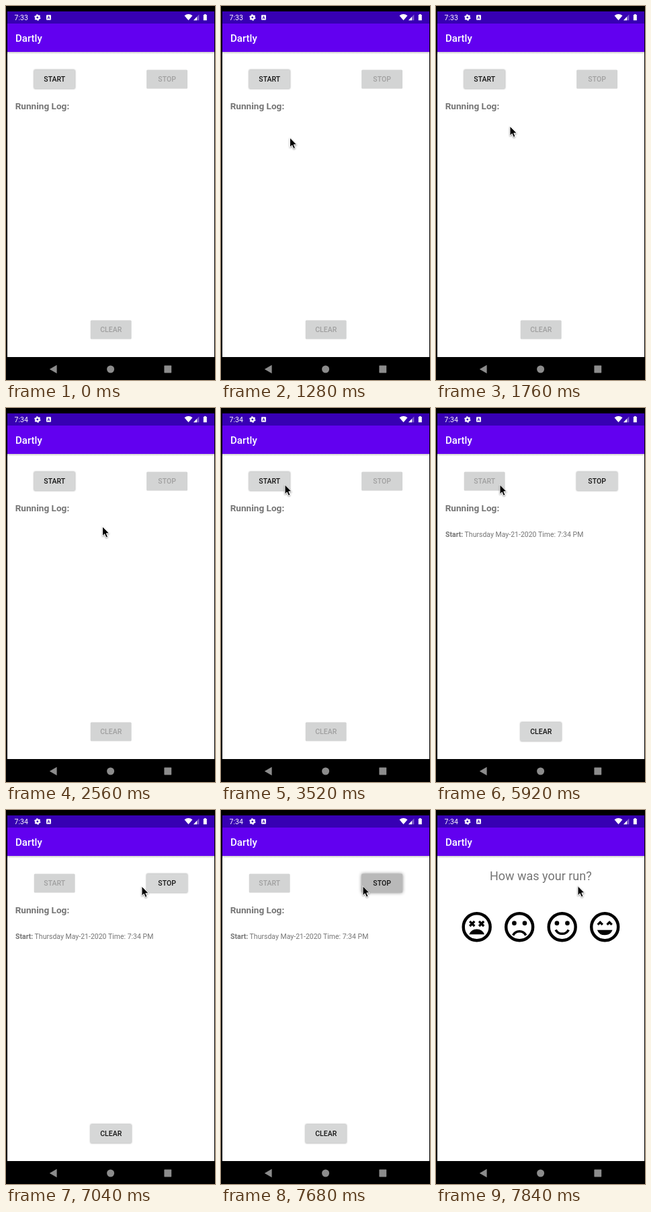
Animation of 311x554 px, one loop 8 s. Source, as an HTML page:

```html
<!DOCTYPE html>
<html lang="en">
<head>
<meta charset="utf-8">
<title>Run log</title>
<style>
  html, body { margin: 0; width: 100%; height: 100%; overflow: hidden; background: #000; }
  svg { display: block; width: 100%; height: 100%; }
  text { font-family: Roboto, sans-serif; font-size: 10.5px; fill: #757575; }
  .bar { fill: #fff; }
  .title { font-size: 15px; font-weight: 500; }
  .heading { font-size: 13.6px; font-weight: 700; }
  .bold { font-weight: 700; }
  .question { font-size: 18px; text-anchor: middle; }
  .button rect { fill: #d6d7d7; filter: drop-shadow(0 .8px .8px #0006); }
  .button text { fill: #151515; font-weight: 500; text-anchor: middle; }
  .button.disabled rect { fill: #d3d4d4; filter: none; }
  .button.disabled text { fill: #a0a0a0; }
  .button.pressed rect { fill: #b9b9b9; filter: drop-shadow(0 .8px 2.5px #0007); }
  .cursor { filter: drop-shadow(0 1px 1px #0006); }
  .line { fill: none; stroke: #000; stroke-width: 2; }
</style>
</head>
<body>
<svg viewBox="0 0 311 554" preserveAspectRatio="none">
  <defs>
    <linearGradient id="shade" x2="0" y2="1">
      <stop stop-color="#000" stop-opacity=".2"/>
      <stop offset="1" stop-color="#000" stop-opacity="0"/>
    </linearGradient>
  </defs>
  <rect width="311" height="554"/>
  <rect x="2" y="8" width="308" height="512" fill="#fff"/>
  <rect x="2" y="8" width="308" height="18" fill="#3700b3"/>
  <rect x="2" y="26" width="308" height="42" fill="#6200f0"/>
  <rect x="2" y="68" width="308" height="3.5" fill="url(#shade)"/>

  <g class="bar">
    <text id="clock" class="bar" x="12.6" y="21"></text>
    <circle cx="46.8" cy="17" r="2.6" fill="none" stroke="#fff" stroke-width="2.2"/>
    <circle cx="46.8" cy="17" r="4.1" fill="none" stroke="#fff" stroke-width="1.3" stroke-dasharray="2.15"/>
    <rect x="60" y="13.2" width="7" height="7.6" rx="1"/>
    <path d="M61.8 19.3 63.5 14.9 65.2 19.3M62.5 17.8H64.5" fill="none" stroke="#3700b3" stroke-width=".9"/>
    <path d="M271.5 21.2 265.5 14.2Q271.5 9.8 277.5 14.2Z"/>
    <path d="M279 21.2H287.3V12.6Z" opacity=".35"/>
    <path d="M279 21.2H284V16Z"/>
    <path d="M293.8 13H295.2V12H297.4V13H298.8V21.2H293.8Z"/>
    <text class="bar title" x="14" y="53">Dartly</text>
  </g>

  <g fill="#8c8c8c">
    <path d="M64.8 538 75.6 531.8V544.2Z"/>
    <circle cx="155.6" cy="538" r="5.5"/>
    <rect x="235.4" y="532.6" width="10.8" height="10.8" rx=".6"/>
  </g>

  <g id="home">
    <text class="heading" x="13.7" y="153">Running Log:</text>
    <g id="entry">
      <text class="bold" x="14" y="190.8">Start:</text>
      <text x="42.6" y="190.8">Thursday May-21-2020 Time: 7:34 PM</text>
    </g>
  </g>

  <g id="rating">
    <text class="question" x="155.8" y="104">How was your run?</text>
  </g>

  <path id="cursor" class="cursor" d="M0 0V14.2L3.2 11.2 5.5 16.4 8 15.3 5.8 10.3H10.2Z"
        stroke="#fff" stroke-width="1" stroke-linejoin="round"/>
</svg>
<script>
const LOOP = 8000, STEP = 160;
const CLOCK_TICK = 2560;
const START_DOWN = 3680, STARTED = 3840;
const STOP_DOWN = 7680, FINISHED = 7840;

// Pointer tip: time, x, y
const path = [
  [800, 87, 433], [960, 88, 350], [1120, 96, 240], [1280, 102.5, 195],
  [1600, 107, 183], [1760, 110, 178], [1920, 120, 176], [2240, 143.5, 175.5],
  [2560, 143.5, 175.5], [2880, 130, 155], [3200, 107, 125], [3520, 95, 113.5],
  [6400, 95, 113.5], [6560, 103, 114], [6720, 135, 115], [6880, 173, 114],
  [7040, 202, 113], [7200, 211, 112.5]
];

const byId = id => document.getElementById(id);
const [clock, home, entry, rating, cursor] =
  ['clock', 'home', 'entry', 'rating', 'cursor'].map(byId);

function svg(parent, name, attrs, content = '') {
  const node = document.createElementNS('http://www.w3.org/2000/svg', name);
  for (const key in attrs) node.setAttribute(key, attrs[key]);
  node.innerHTML = content;
  return parent.appendChild(node);
}

function addButton(label, x, y) {
  return svg(home, 'g', { class: 'button' },
    `<rect x="${x - 30.5}" y="${y - 14}" width="61" height="28" rx="1.5"/>
     <text x="${x}" y="${y + 3.8}">${label}</text>`);
}

const start = addButton('START', 72.2, 108.5);
const stop = addButton('STOP', 239.6, 108.5);
const clear = addButton('CLEAR', 156.2, 479.6);

const dots = '<circle cx="8.5" cy="9.5" r="1.5"/><circle cx="15.5" cy="9.5" r="1.5"/>';
const eyes = d => [8.88, 15.12].map(x =>
  `<path class="line" style="stroke-width:1.5" transform="translate(${x} 9.88)" d="${d}"/>`).join('');
const mouth = d => `<path d="${d}"/>`;
const curve = d => `<path class="line" style="stroke-width:1.6" d="${d}"/>`;

[
  eyes('M-1.6-1.6 1.6 1.6M1.6-1.6-1.6 1.6') + mouth('M6.89 17a5.5 5.5 0 0 1 10.22 0Z'),
  dots + curve('M7.7 17.6a4.8 4.8 0 0 1 8.6 0'),
  dots + curve('M7.7 13.9a4.8 4.8 0 0 0 8.6 0'),
  eyes('M-1.6.6 0-1 1.6.6') + mouth('M6.89 14a5.5 5.5 0 0 0 10.22 0Z')
].forEach((face, i) => svg(rating, 'g',
  { transform: `translate(${60.7 + i * 63.5} 173.2) scale(2.22) translate(-12 -12)` },
  '<circle class="line" cx="12" cy="12" r="9"/>' + face));

function pointerAt(t) {
  const next = path.findIndex(p => p[0] > t);
  if (next < 0) return path.at(-1).slice(1);
  const [t0, x0, y0] = path[next - 1], [t1, x1, y1] = path[next];
  const k = (t - t0) / (t1 - t0);
  return [x0 + (x1 - x0) * k, y0 + (y1 - y0) * k];
}

const show = (node, on) => node.setAttribute('display', on ? 'inline' : 'none');

function setButton(node, enabled, pressed = false) {
  node.setAttribute('class', 'button' + (pressed ? ' pressed' : enabled ? '' : ' disabled'));
}

function draw(now) {
  const t = Math.floor(now % LOOP / STEP) * STEP;
  const running = t >= STARTED;

  clock.textContent = t < CLOCK_TICK ? '7:33' : '7:34';
  show(home, t < FINISHED);
  show(rating, t >= FINISHED);
  show(entry, running);
  setButton(start, !running, t >= START_DOWN && !running);
  setButton(stop, running, t >= STOP_DOWN);
  setButton(clear, running);

  const visible = t >= path[0][0];
  show(cursor, visible);
  if (visible) cursor.setAttribute('transform', `translate(${pointerAt(t)})`);
}

const origin = performance.now();
function tick() {
  draw(performance.now() - origin);
  requestAnimationFrame(tick);
}
tick();
</script>
</body>
</html>
```
